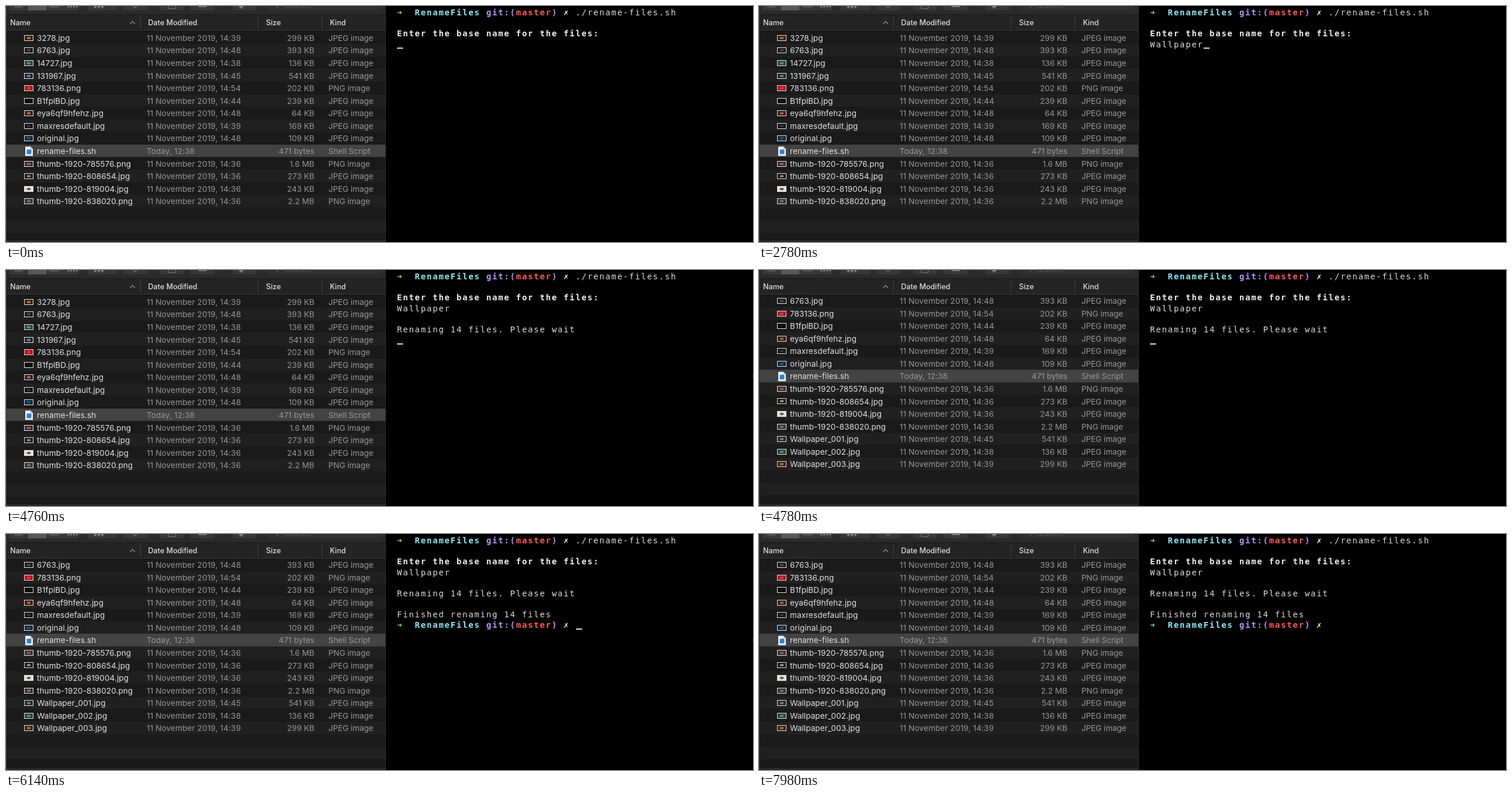
Animation, 1280 px wide and 405 px high, one loop 8000 ms. Source, as an HTML page:

```html
<!DOCTYPE html>
<html lang="en">
<head>
<meta charset="utf-8">
<title>Batch rename</title>
<style>
html, body { margin: 0; width: 100%; height: 100%; overflow: hidden; background: #000; }
svg { display: block; width: 1280px; height: 405px; }
.ui { font: 13.6px Inter, "Open Sans", sans-serif; }
.head { font: 500 12.6px Inter, "Open Sans", sans-serif; fill: #dedede; }
.name { fill: #e2e2e2; letter-spacing: .06px; }
.info { fill: #989898; }
.date { letter-spacing: .12px; }
.end { text-anchor: end; }
.kind { letter-spacing: -.08px; }
.term { font: 14px "DejaVu Sans Mono", monospace; letter-spacing: 1.77px; fill: #dcdcdc; }
.bold { font-weight: bold; }
</style>
</head>
<body>
<svg viewBox="0 0 1280 405" xmlns="http://www.w3.org/2000/svg">
  <defs><clipPath id="pane"><rect x="0" y="42" width="651" height="361"/></clipPath></defs>
  <rect width="1280" height="405" fill="#000"/>
  <g id="list" clip-path="url(#pane)"></g>
  <g id="chrome"></g>
  <g id="terminal"></g>
  <rect id="cursor" width="10.4" height="2.4" fill="#c8c8c8"/>
</svg>
<script>
const LOOP = 8000;
const PITCH = 10.2;
const LINE = 18.18;
const TYPED = "Wallpaper";
const at = { hide: 1120, type: 2520, renaming: 4200, renamed: 4780, finished: 5400, idle: 7060 };

const $ = id => document.getElementById(id);
const rect = (x, y, w, h, fill, rx = 0) =>
  `<rect x="${x}" y="${y}" width="${w}" height="${h}" fill="${fill}" rx="${rx}"/>`;
const label = (x, y, cls, s, fill = "") =>
  `<text x="${x}" y="${y}" class="${cls}" fill="${fill}">${s}</text>`;
const path = (d, stroke, w = 1) =>
  `<path d="${d}" fill="none" stroke="${stroke}" stroke-width="${w}"/>`;

// name, time, size, thumbnail background, thumbnail detail
const files = [
  ["3278.jpg", "14:39", "299 KB", "#3a2015", "#c98a52"],
  ["6763.jpg", "14:48", "393 KB", "#17191a", "#5b5a52"],
  ["14727.jpg", "14:38", "136 KB", "#28463a", "#7f9b88"],
  ["131967.jpg", "14:45", "541 KB", "#1d2a30", "#87959b"],
  ["783136.png", "14:54", "202 KB", "#b3131c", "#d9525a"],
  ["B1fplBD.jpg", "14:44", "239 KB", "#050505", "#151515"],
  ["eya6qf9hfehz.jpg", "14:48", "64 KB", "#3b1a12", "#cf8358"],
  ["maxresdefault.jpg", "14:39", "169 KB", "#101414", "#34403c"],
  ["original.jpg", "14:48", "109 KB", "#14293a", "#2f6280"],
  ["rename-files.sh", "", "471 bytes"],
  ["thumb-1920-785576.png", "14:36", "1.6 MB", "#3d302e", "#8d7b77"],
  ["thumb-1920-808654.jpg", "14:36", "273 KB", "#121619", "#aeb8bd"],
  ["thumb-1920-819004.jpg", "14:36", "243 KB", "#e6e2df", "#33272a"],
  ["thumb-1920-838020.png", "14:36", "2.2 MB", "#3a3334", "#94807e"]
];
const moved = [3, 2, 0];
const after = files.filter((f, i) => !moved.includes(i)).concat(
  moved.map((k, i) => [`Wallpaper_00${i + 1}.jpg`, ...files[k].slice(1)]));

function icon(f, y) {
  if (!f[3])
    return `<path d="M33 ${y - 8}h9l4 4v12h-13z" fill="#f2f2f2"/>` +
      `<path d="M42 ${y - 8}v4h4z" fill="#b9b9b9"/>` + rect(35.5, y - 3, 8, 8, "#2786d3", 1);
  const top = Math.round(y - 5.3);
  return rect(31, top, 16, 10, "#e4e4e4") + rect(32, top + 1, 14, 8, f[3]) +
    `<ellipse cx="39" cy="${top + 5}" rx="3.4" ry="2" fill="${f[4]}" opacity=".75"/>`;
}

function drawList(rows, first, step) {
  let s = rect(0, 42, 651, 363, "#1a1a1a");
  for (let i = 0; i < 17; i++) {
    const y = first + i * step, f = rows[i], script = f && !f[3];
    const top = Math.round(y - step / 2 - 0.6), bottom = Math.round(y + step / 2 - 0.6);
    s += rect(0, top, 651, bottom - top, script ? "#434343" : i % 2 ? "#202020" : "#1a1a1a");
    if (!f) continue;
    const kind = script ? "Shell Script" : f[0].endsWith("png") ? "PNG image" : "JPEG image";
    const date = script ? "Today, 12:38" : `11 November 2019, ${f[1]}`;
    const b = y + 4.8;
    s += icon(f, y) + label(53, b, "ui name", f[0]) + label(241, b, "ui info date", date) +
      label(528.5, b, "ui info end", f[2]) + label(552.5, b, "ui info kind", kind);
  }
  $("list").innerHTML = s;
}

function drawChrome() {
  let s = rect(0, 0, 651, 15, "#2a2a2a") + rect(0, 15, 651, 27, "#242424") +
    rect(0, 14.5, 651, 1, "#151515") + rect(0, 41, 651, 1, "#383838");
  for (const [x, w] of [[6, 119], [140, 51], [201, 41], [264, 41], [316, 41], [388, 41]])
    s += rect(x, -12, w, 19.5, "#373737", 3);
  s += rect(38, -12, 31, 19.5, "#585858") + rect(448, -12, 194, 19.5, "#303030", 3);
  const ink = "#7a7a7a";
  s += path("M14 1.5h14M75 1.5h17", ink);
  for (let i = 0; i < 4; i++)
    s += rect(105 + i * 5, 0, 3, 2.5, ink) + (i < 3 ? rect(151 + i * 6, 0, 4, 3.5, ink) : "");
  s += path("M217 0l4 3.5l4-3.5M221 0v4", ink) + path("M278 0v4.5h12v-4.5", ink) +
    rect(330, 0, 14, 2, ink) + `<path d="M398 0h10l-5 5z" fill="${ink}"/>` +
    path("M463 0l4 3.5", "#5c5c5c", 1.3) + label(476, 3.5, "ui", "Search", "#505050");
  for (const x of [230, 431, 541]) s += rect(x, 18, 1, 21, "#444");
  s += path("M213 30.5l4-4l4 4", "#999", 1.2);
  [["Name", 7], ["Date Modified", 243.5], ["Size", 445.5], ["Kind", 555]]
    .forEach(([t, x]) => s += label(x, 33, "head", t));
  s += rect(0, 0, 1, 405, "#343434") + rect(650, 0, 1, 405, "#2c2c2c") +
    rect(0, 403, 651, 1, "#454545") + rect(0, 404, 651, 1, "#111");
  $("chrome").innerHTML = s;
}

const put = (col, row, text, fill = "#dcdcdc", bold = true) =>
  `<text x="${670 + col * PITCH}" y="${16 + row * LINE}" class="term${bold ? " bold" : ""}" style="fill:${fill}">${text}</text>`;
const plain = (col, row, text) => put(col, row, text, "#dcdcdc", false);
const prompt = row => put(0, row, "➜", "#5af78e") + put(3, row, "RenameFiles", "#8fe9fb") +
  put(15, row, "git:(", "#bd93f9") + put(20, row, "master", "#ff5c57") +
  put(26, row, ")", "#bd93f9") + put(28, row, "✗", "#f3f99d");

function drawTerminal(typed, stage) {
  let s = prompt(0) + plain(30, 0, "./rename-files.sh") +
    put(0, 2, "Enter the base name for the files:", "#f0f0f0") +
    plain(0, 3, TYPED.slice(0, typed));
  if (stage > 0) s += plain(0, 5, "Renaming 14 files. Please wait");
  if (stage > 1) s += plain(0, 7, "Finished renaming 14 files") + prompt(8);
  $("terminal").innerHTML = s;
}

let listKey, termKey;
function render(t) {
  const renamed = t >= at.renamed;
  if (renamed !== listKey) {
    listKey = renamed;
    renamed ? drawList(after, 53.5, 21.53) : drawList(files, 55.1, 21.57);
  }
  const typed = Math.max(0, Math.min(TYPED.length, Math.floor((t - at.type) / 25) + 1));
  const stage = t >= at.finished ? 2 : t >= at.renaming ? 1 : 0;
  const key = typed + ":" + stage;
  if (key !== termKey) {
    termKey = key;
    drawTerminal(typed, stage);
  }
  const [col, row] = [[typed, 3], [0, 6], [30, 8]][stage];
  const on = t < at.hide || (t >= at.type && t < at.idle);
  const c = $("cursor");
  c.setAttribute("x", 670 + col * PITCH + (stage > 1 ? 0.8 : 0));
  c.setAttribute("y", 71.2 + (row - 3) * LINE);
  c.setAttribute("visibility", on ? "visible" : "hidden");
}

drawChrome();
render(0);
const start = performance.now();
function tick() {
  render((performance.now() - start) % LOOP);
  requestAnimationFrame(tick);
}
requestAnimationFrame(tick);
</script>
</body>
</html>
```
